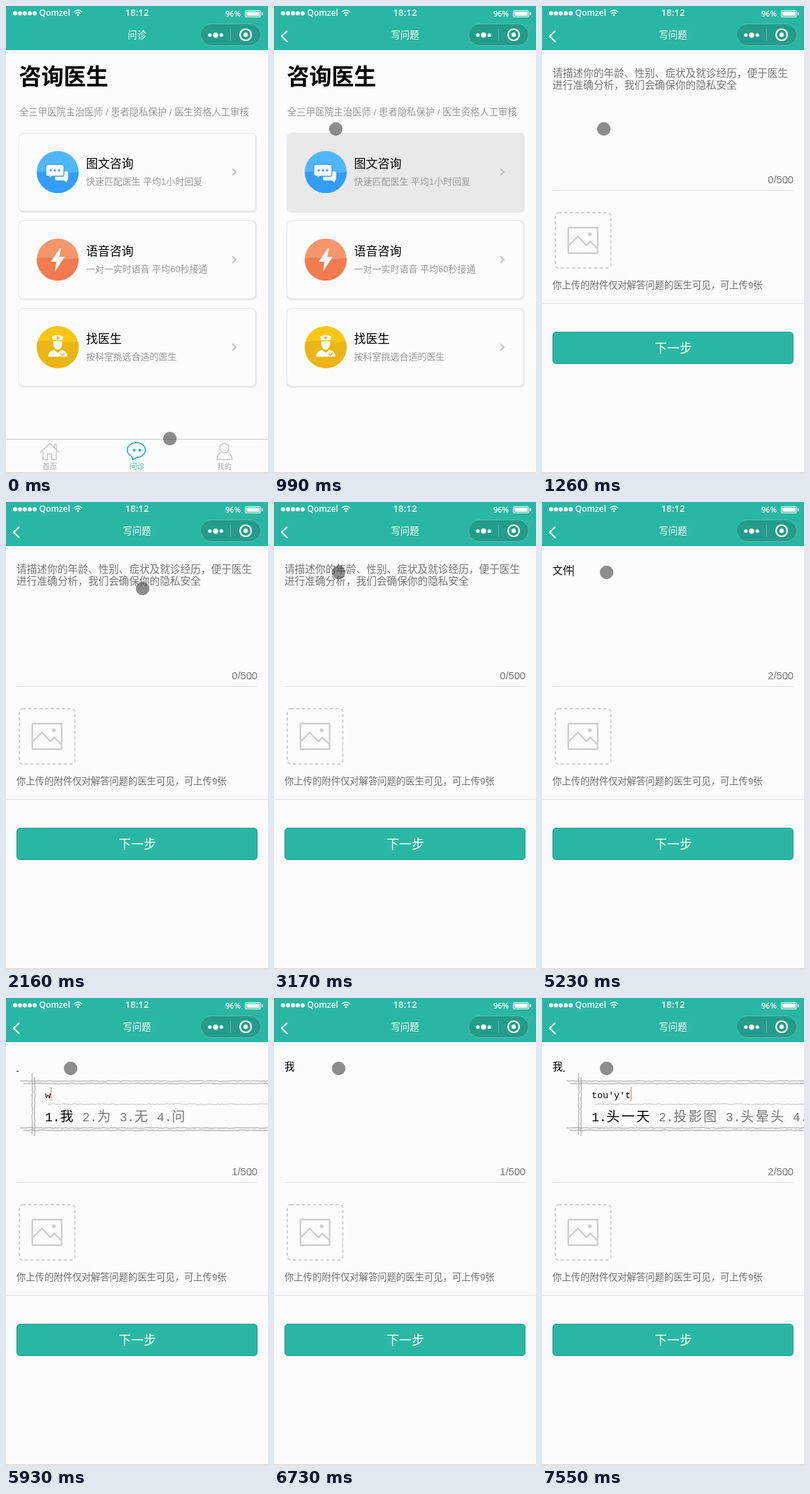
Write an HTML page that moves like this. It is 375 by 668 pixels and loops after 8000 ms.

```html
<!DOCTYPE html>
<html lang="zh-CN">
<head>
<meta charset="utf-8">
<style>
html, body { margin: 0; width: 100%; height: 100%; overflow: hidden; background: #fcfcfc; }
svg { display: block; width: 100vw; height: 100vh; }
text { font-family: "Liberation Sans", "Noto Sans CJK SC", "Noto Sans CJK", sans-serif; white-space: pre; }
.ui { font-family: "Open Sans", "Noto Sans", sans-serif; font-weight: 600; fill: #fff; }
.mid { text-anchor: middle; }
.s13 { font-size: 13.33px; }
.grey { fill: #999; }
.field { font-size: 14.67px; }
.hint { fill: #777; }
.line { fill: none; stroke-linejoin: round; }
.tab { font-size: 10.5px; text-anchor: middle; fill: #aaa; }
.mono { font-family: "Liberation Mono", monospace; }
.han { font-family: "Noto Sans CJK SC", "Noto Sans CJK", sans-serif; font-size: 19px; font-weight: 300; letter-spacing: 2.33px; }
</style>
</head>
<body>
<svg viewBox="0 0 375 668">
  <rect width="375" height="668" fill="#fcfcfc"/>

  <g id="listPage">
    <text x="18.5" y="111.5" font-size="32" font-weight="bold">咨询医生</text>
    <text x="19" y="156.3" class="s13 grey">全三甲医院主治医师 / 患者隐私保护 / 医生资格人工审核</text>
    <g id="cards"></g>
  </g>

  <g id="tabs" class="line" stroke="#c2c2c2" stroke-width="1.3">
    <path d="M0 618.5H375" stroke="#ccc" stroke-width="1"/>
    <path d="M49 637.5L62.5 624L76 637.5M53 635V647.5H59.5V639.5H65.500V647.5H72V635M69.5 630V625.5H72V633"/>
    <g stroke="#29b7a3" stroke-width="1.7">
      <path d="M180 642.8A13 10.5 0 1 1 187.5 644.2L181.500 647.500Z"/>
      <g fill="#29b7a3" stroke="none"><circle cx="183.5" cy="634" r="2"/><circle cx="191.5" cy="634" r="2"/></g>
    </g>
    <circle cx="312.5" cy="631" r="6.6"/>
    <path d="M308.500 636.500C304 639 302 643 302 647.3H323.5C323.5 643 321 639 316.500 636.500"/>
    <g stroke="none">
      <text class="tab" x="62.5" y="661">首页</text>
      <text class="tab" x="187.5" y="661" style="fill:#29b7a3">问诊</text>
      <text class="tab" x="312.5" y="661">我的</text>
    </g>
  </g>

  <g id="formPage">
    <g id="hint" class="field hint">
      <text x="15" y="101.3">请描述你的年龄、性别、症状及就诊经历，便于医生</text>
      <text x="15" y="118.3">进行准确分析，我们会确保你的隐私安全</text>
    </g>
    <text id="typed" class="field" x="15" y="103"></text>
    <rect id="caret" y="90" width="1" height="16"/>
    <rect id="mark" y="104" width="3" height="1"/>
    <text id="count" class="field hint" x="360" y="253" text-anchor="end"></text>
    <path d="M15 263.5H360M0 424.5H375" stroke="#e2e2e2"/>
    <g class="line" stroke="#d0d0d0">
      <rect x="19" y="295" width="79.5" height="79" rx="5" stroke-width="2" stroke-dasharray="4.5 3.5"/>
      <rect x="37.7" y="316.2" width="42" height="36.6" rx="1" stroke-width="2.4"/>
      <path d="M38 342L51 329L64 342L69 336L79.5 346" stroke-width="2.4"/>
      <circle cx="68.5" cy="326" r="2.8" fill="#d0d0d0" stroke="none"/>
    </g>
    <text x="15" y="403" class="s13" fill="#707070">你上传的附件仅对解答问题的医生可见，可上传9张</text>
    <rect x="15.5" y="465.5" width="344" height="45" rx="4.5" fill="#29b7a3" stroke="#21998a"/>
    <text x="188" y="494.5" class="mid" font-size="18" fill="#fff">下一步</text>
    <g id="ime">
      <path id="frame" class="line" stroke="#909090" stroke-opacity=".6" stroke-width=".9"/>
      <text id="keys" class="mono" x="71" y="143" font-size="13.33"></text>
      <rect id="imeCaret" y="127" width="1" height="20" fill="#d9735a"/>
      <text id="words" class="mono" x="71" y="176" font-size="17.78"></text>
    </g>
  </g>

  <path d="M0 666.5H375" stroke="#cfcfcf" stroke-width="1.5"/>

  <rect width="375" height="63" fill="#29b7a3"/>
  <g id="dots" fill="#fff"></g>
  <text class="ui" x="47.5" y="14" font-size="12">Qomzel</text>
  <g class="line" stroke="#fff" stroke-width="1.5">
    <path d="M97 8.5Q103 3.500 109 8.5M99.3 11Q103 7.8 106.7 11"/>
    <circle cx="103" cy="13" r="1.3" fill="#fff" stroke="none"/>
  </g>
  <text class="ui mid" x="187.5" y="14" font-size="13.3">18:12</text>
  <text class="ui" x="314" y="15" font-size="11">96%</text>
  <rect x="342.5" y="6.5" width="22" height="9" rx="1.5" fill="none" stroke="#fff"/>
  <path d="M344 8H363V14H344ZM366 9H368V13H366Z" fill="#fff"/>
  <text id="title" class="s13 mid" x="187.5" y="46" fill="#fff"></text>
  <path id="back" class="line" d="M19 35.5L11 43L19 51" stroke="#fff" stroke-width="2"/>
  <rect x="278.5" y="25.5" width="86" height="31" rx="15.5" fill="#000" fill-opacity=".15" stroke="#fff" stroke-opacity=".22"/>
  <path d="M321.5 32V50" stroke="#fff" stroke-opacity=".25"/>
  <g fill="#fff">
    <circle cx="291.8" cy="41.5" r="2.5"/><circle cx="300" cy="41.5" r="3.8"/><circle cx="308.2" cy="41.5" r="2.5"/>
    <circle cx="343" cy="41" r="3.2"/>
  </g>
  <circle cx="343" cy="41" r="8" fill="none" stroke="#fff" stroke-width="2.2"/>

  <circle id="pointer" r="9.7" fill="#282828" fill-opacity=".53"/>
</svg>
<script>
const LOOP = 8000;
const $ = id => document.getElementById(id);
const show = (id, on) => $(id).style.display = on ? '' : 'none';

// Cards: title, subtitle, upper and lower icon tone, height of their border, icon shape
const cards = [
  ['图文咨询', '快速匹配医生 平均1小时回复', '#4fb6fd', '#339dfa', 0, c => `
    <path d="M-4 -1H12Q15 -1 15 2V9Q15 12 13 12V15L9 12H-1Q-4 12 -4 9Z"/>
    <path d="M-14 -11H6Q9 -11 9 -8V3Q9 6 6 6H-8L-12 9.5V6H-14Q-17 6 -17 3V-8Q-17 -11 -14 -11Z" stroke="${c}" stroke-width="1.3"/>
    <path d="M-10 -2.5h.1M-4 -2.5h.1M2 -2.5h.1" stroke="${c}" stroke-width="3.2" stroke-linecap="round"/>`],
  ['语音咨询', '一对一实时语音 平均60秒接通', '#f5966b', '#f27b50', -2, () =>
    '<path d="M3 -16L-10 3H-2L-4 17L10 -4H2L5 -16Z"/>'],
  ['找医生', '按科室挑选合适的医生', '#f7c80e', '#e9b615', -8, c => `
    <path d="M-6.5 -10L-8 -15Q0 -20 8 -15L6.5 -10Z"/>
    <path d="M-6.5 -8.5H6.5Q7 3 0 3.500Q-7 3 -6.5 -8.5Z"/>
    <path d="M-13.500 13.500Q-14 5 -5 4L0 8L5 4Q14 5 13.500 13.500Z"/>
    <path d="M0 -16V-11M-2.5 -13.5H2.5M4 9L7 12L10 8" fill="none" stroke="${c}" stroke-width="1.4"/>`]
];
$('cards').innerHTML = cards.map(([name, note, top, low, h, shape], i) => {
  const half = Math.sqrt(900 - h * h);
  return `
  <g transform="translate(0 ${125 * i})">
    <rect x="18" y="181" width="341" height="114" rx="7" fill="#e9e9e9"/>
    <rect class="face" x="19" y="182" width="337.5" height="110" rx="6" fill="#fcfcfc"/>
    <g transform="translate(74 237)" fill="#fff">
      <circle r="30" fill="${top}"/>
      <path d="M${-half} ${h}Q${-half / 2} ${h - 2} 0 ${h}T${half} ${h}A30 30 0 ${h < 0 ? 1 : 0} 1 ${-half} ${h}Z" fill="${low}"/>
      ${shape(low)}
    </g>
    <text x="114.5" y="231.3" font-size="17">${name}</text>
    <text x="114.5" y="255" class="grey" font-size="13">${note}</text>
    <path d="M324 232.3L329 237L324 241.7" class="line" stroke="#c6c6c6" stroke-width="2.3"/>
  </g>`;
}).join('');
$('dots').innerHTML = [0, 1, 2, 3, 4].map(i => `<circle cx="${13 + 7 * i}" cy="10.5" r="3"/>`).join('');

// Pencil strokes of the input method window
let seed = 7;
const jitter = () => ((seed = seed * 16807 % 2147483647) / 2147483647 - .5) * 1.6;
function rough(x1, y1, x2, y2) {
  const n = Math.round(Math.hypot(x2 - x1, y2 - y1) / 3);
  let d = '';
  for (let i = 0; i <= n; i++) {
    const k = i / n;
    const x = x1 + (x2 - x1) * k, y = y1 + (y2 - y1) * k;
    d += (i ? 'L' : 'M') + (y1 === y2 ? `${x} ${y + jitter()}` : `${x + jitter()} ${y}`);
  }
  return d;
}
const twice = (...ends) => rough(...ends) + rough(...ends);
$('frame').setAttribute('d',
  [[35, 118.5], [40, 122], [35, 185.5], [40, 189]].map(([x, y]) => twice(x, y, 420, y)).join('') +
  rough(75, 151.5, 420, 151.5) + twice(52.5, 107, 52.5, 195) + twice(56, 113, 56, 197));

// Pointer: time, x, y
const moves = [
  [0, 234.5, 617.5], [150, 232, 600], [300, 225, 510], [440, 219, 375], [580, 216, 265], [720, 215, 235],
  [990, 88.5, 175.5], [1400, 100, 178], [1540, 125, 182], [1650, 160, 185], [1780, 200, 185], [1900, 238, 183],
  [2030, 222, 150], [2160, 195.5, 123.5], [2310, 170, 118], [2430, 125, 108], [2640, 95, 101], [2860, 92.5, 100.5]
];

// Field: time, text, caret shown, keys being composed, candidates
const edits = [
  [0, '', 0], [2640, '', 1], [3170, '', 0], [3600, 'w', 1], [4510, 'w', 0],
  [4630, '', 0, 'w', '我 为 无 问'],
  [4770, '', 0, 'we', '我 文 问 为'],
  [4900, '', 0, 'wen', '问 文 闻 稳'],
  [5060, '', 0, "wen'jian", '文件 问 文 闻'],
  [5230, '文件', 1], [5630, '文', 1], [5770, '', 1],
  [5900, '', 0, 'w', '我 为 无 问'],
  [6050, '', 0, 'wo', '我 握 窝 卧'],
  [6200, '我', 1], [6730, '我', 0],
  [7040, '我', 0, 't', '他 她 天 太'],
  [7170, '我', 0, 'to', '头 同 投 图'],
  [7300, '我', 0, 'tou', '头 投 偷 透'],
  [7420, '我', 0, "tou'y", '头晕 投影 偶 头'],
  [7550, '我', 0, "tou'y't", '头一天 投影图 头晕头 头']
];
const at = (list, t) => list.findLast(step => step[0] <= t);

function drawField([, text, caret, keys, words]) {
  $('typed').textContent = text;
  $('count').textContent = text.length + (keys ? 1 : 0) + '/500';
  show('hint', !text && !keys);
  const end = Math.round(15 + (text ? $('typed').getComputedTextLength() : 0));
  show('caret', caret);
  $('caret').setAttribute('x', end);
  show('mark', keys);
  $('mark').setAttribute('x', end);
  show('ime', keys);
  if (!keys) return;
  $('ime').setAttribute('transform', `translate(${end - 30} 0)`);
  $('keys').textContent = keys;
  $('imeCaret').setAttribute('x', 71 + 8 * keys.length);
  $('words').innerHTML = words.split(' ').map((w, i) =>
    `<tspan fill="${i ? '#777' : '#000'}">${i + 1}.<tspan class="han">${w}</tspan> </tspan>`).join('');
}

let drawn;
function draw(now) {
  const t = now % LOOP;
  const [, x, y] = at(moves, t);
  $('pointer').setAttribute('cx', x);
  $('pointer').setAttribute('cy', y);
  const opened = t >= 850, form = t >= 1260;
  $('title').textContent = opened ? '写问题' : '问诊';
  show('back', opened);
  show('tabs', !opened);
  show('listPage', !form);
  show('formPage', form);
  document.querySelector('.face').style.display = t >= 720 && t < 1140 ? 'none' : '';
  const step = at(edits, t);
  if (form && step !== drawn) {
    drawField(step);
    drawn = step;
  }
  requestAnimationFrame(draw);
}
requestAnimationFrame(draw);
</script>
</body>
</html>
```
